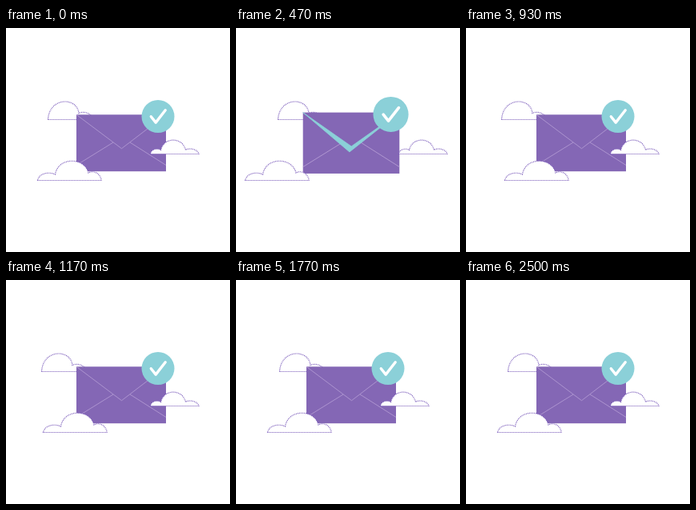
An HTML page with a canvas for the animation above (2530 ms loop, 280x280 px).

```html
<!DOCTYPE html>
<html lang="en">
<head>
<meta charset="utf-8">
<title>Envelope</title>
<style>
html, body { margin: 0; width: 100%; height: 100%; overflow: hidden; background: #fff; }
canvas { display: block; width: 280px; height: 280px; }
</style>
</head>
<body>
<canvas id="stage" width="280" height="280"></canvas>
<script>
const ctx = document.getElementById('stage').getContext('2d');
const LOOP = 2530;
const PURPLE = '#8467b5', OUTLINE = '#7656b8', SEAM = '#b79fd6', TEAL = '#8bd0d8', WHITE = '#fff';
const CENTER = { x: 144, y: 143.5 };

// Eased step from 0 to 1 between two times
function ease(t, from, to) {
  const u = Math.min(1, Math.max(0, (t - from) / (to - from)));
  return u * u * (3 - 2 * u);
}

// Rises to 1, holds, falls back to 0
const swell = (t, start, full, release, end) => ease(t, start, full) - ease(t, release, end);

const envelopeScale = t => 1 + 0.093 * swell(t, 0, 260, 370, 750);
const badgeScale = t => 1 + 0.1 * swell(t, 0, 200, 250, 470);
const flapGap = t => 6.5 * swell(t, 200, 460, 500, 800);

// The clouds are pushed away, then drift past their place and settle
const rightShift = t => 25 * swell(t, 0, 250, 400, 830);
const lowShift = t => -28.5 * swell(t, 0, 280, 430, 870) + 9 * swell(t, 430, 870, 980, 1580);
const topShift = t => -8.5 * swell(t, 530, 1000, 1080, 1720)
  + 2 * swell(t, 1080, 1720, 1820, 2130) - 1.5 * swell(t, 1820, 2130, 2170, 2500);

const clouds = {
  top: new Path2D('M52.5 114.5C54 86 89 86 91 106.5C97 103.5 106 106 110 114.5Z'),
  low: new Path2D('M39.5 190.5C41 182 53 179 61.5 183C65 161 98 161 103 181C110 177 119 183 119 190.5Z'),
  right: new Path2D('M180.5 157.5C181 151 190 150 193.5 152.5C197 136 221 136 224.5 152.5C230 149 240 152 241 157.5Z')
};

function drawCloud(path, shift) {
  ctx.save();
  ctx.translate(Math.round(shift), 0);
  ctx.fillStyle = WHITE;
  ctx.fill(path);
  ctx.setLineDash([1, 1]);
  ctx.strokeStyle = OUTLINE;
  ctx.lineWidth = 1.2;
  ctx.stroke(path);
  ctx.restore();
}

function trace(...points) {
  ctx.beginPath();
  points.forEach(([x, y]) => ctx.lineTo(x, y));
}

function line(color, width, ...points) {
  trace(...points);
  ctx.strokeStyle = color;
  ctx.lineWidth = width;
  ctx.stroke();
}

function drawEnvelope(gap) {
  const left = [88, 108.3], right = [200, 108.3];
  ctx.fillStyle = PURPLE;
  ctx.fillRect(88, 108.3, 112, 70.9);
  line(SEAM, 0.8, [88, 171.5], [134, 143]);
  line(SEAM, 0.8, [155, 143], [200, 171.5]);
  if (gap <= 0) {
    line(SEAM, 0.8, left, [144.5, 150.7], right);
    return;
  }

  // The flap lifts and uncovers a teal strip
  const inner = [144.2, 149.8 - gap / 3], outer = [144.2 - gap / 3, 149.8 + gap * 2 / 3];
  trace(left, inner, right, outer);
  ctx.closePath();
  ctx.globalAlpha = Math.min(1, gap * 4);
  ctx.fillStyle = ctx.strokeStyle = TEAL;
  ctx.lineWidth = 0.8;
  ctx.fill();
  ctx.stroke();
  ctx.globalAlpha = 1;
}

function drawBadge(scale) {
  ctx.save();
  ctx.translate(190, 110.5);
  ctx.scale(scale, scale);
  ctx.beginPath();
  ctx.arc(0, 0, 20.5, 0, Math.PI * 2);
  ctx.fillStyle = TEAL;
  ctx.fill();
  ctx.lineCap = ctx.lineJoin = 'round';
  line(WHITE, 3.4, [-8.7, 0.2], [-2.8, 7.6], [9.2, -7.7]);
  ctx.restore();
}

function draw(t) {
  ctx.fillStyle = WHITE;
  ctx.fillRect(0, 0, 280, 280);
  drawCloud(clouds.top, topShift(t));

  const scale = envelopeScale(t);
  ctx.save();
  ctx.translate(CENTER.x, CENTER.y);
  ctx.scale(scale, scale);
  ctx.translate(-CENTER.x, -CENTER.y);
  drawEnvelope(flapGap(t));
  drawBadge(badgeScale(t));
  ctx.restore();

  drawCloud(clouds.right, rightShift(t));
  drawCloud(clouds.low, lowShift(t));
}

const start = performance.now();
function tick() {
  draw((performance.now() - start) % LOOP);
  requestAnimationFrame(tick);
}
tick();
</script>
</body>
</html>
```
